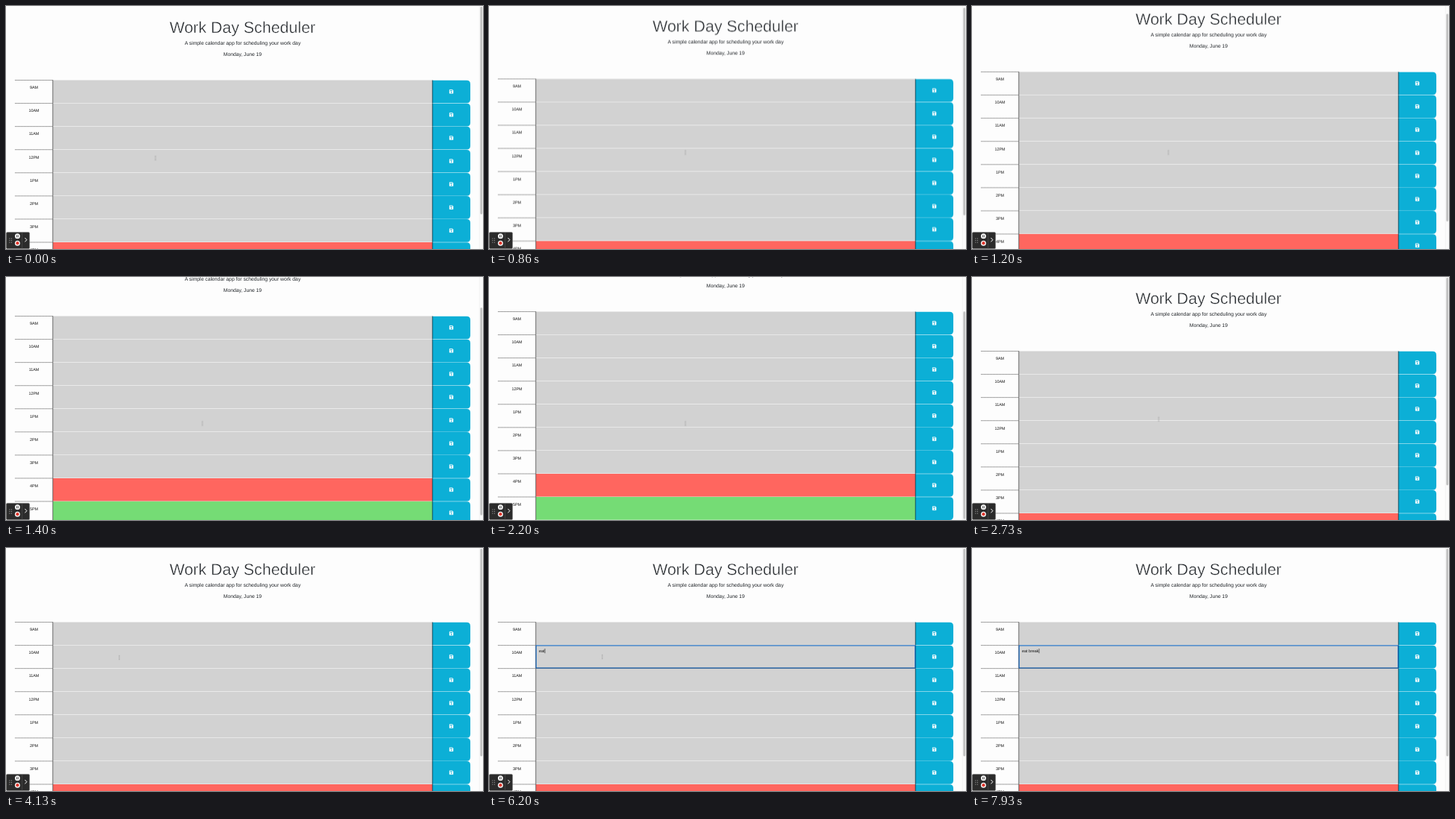
Animation, 640 px wide and 326 px high, one loop 8 s. Source, as an HTML page:

```html
<!DOCTYPE html>
<html lang="en">
<head>
<meta charset="utf-8">
<title>Work Day Scheduler</title>
<style>
  html, body { margin: 0; width: 100%; height: 100%; overflow: hidden; background: #fdfdfd; }
  svg { display: block; width: 100%; height: 100%; }
  text {
    font-family: "Liberation Sans", Arial, sans-serif;
    text-rendering: geometricPrecision;
    fill: #212529;
  }
  .title { font-size: 21.4px; stroke: #fdfdfd; stroke-width: .45px; }
  .lead { font-size: 6.82px; }
  .date { font-size: 6.75px; }
  .hour, #entry { font-size: 5.4px; fill: #111; white-space: pre; }
  .mid { text-anchor: middle; }

  .past { fill: #d2d2d2; }
  .present { fill: #ff665f; }
  .future { fill: #75dc75; }
  .save { fill: #0cafd6; }

  #page, #thumb { animation: scroll 8s linear infinite; }
  #page { --rate: -1px; }
  #thumb { --rate: .855px; }
  @keyframes scroll {
    0%, 10% { transform: translateY(0); }
    15% { transform: translateY(calc(var(--rate) * 11)); }
    17.5% { transform: translateY(calc(var(--rate) * 47)); }
    20%, 28% { transform: translateY(calc(var(--rate) * 53)); }
    30% { transform: translateY(calc(var(--rate) * 32)); }
    32.3%, 100% { transform: translateY(0); }
  }

  #pointer { animation: point 8s infinite, pointer-hide 8s step-end infinite; }
  @keyframes point {
    0%, 2% { transform: translate(200.5px, 204px); }
    9%, 33% { transform: translate(263.5px, 196.5px); }
    43%, 60% { transform: translate(152px, 147px); }
    66%, 100% { transform: translate(152px, 146px); }
  }
  @keyframes pointer-hide { 0% { opacity: .5; } 81% { opacity: 0; } }

  #focus { animation: focus 8s step-end infinite; }
  @keyframes focus { 0% { opacity: 0; } 58.75% { opacity: 1; } }
</style>
</head>
<body>
<svg viewBox="0 0 640 326">
  <defs>
    <g id="disk">
      <path d="M-2.5-2.5h4l1 1v4h-5z" fill="#fff" stroke="#fff" stroke-width=".4" stroke-linejoin="round"/>
      <path d="M-1.7-1.8h2.8v1.2h-2.8z" fill="#0cafd6"/>
      <circle cy="1.1" r=".8" fill="#0cafd6"/>
    </g>
  </defs>

  <g id="page">
    <text class="title mid" x="317.3" y="36">Work Day Scheduler</text>
    <text class="lead mid" x="317.5" y="51.7">A simple calendar app for scheduling your work day</text>
    <text class="date mid" x="317.5" y="67.2">Monday, June 19</text>
    <g id="rows"></g>
    <g id="focus">
      <rect x="63.2" y="130.9" width="508.6" height="30.1" fill="none" stroke="#1268c4" stroke-width="1.1"/>
      <path d="M63 161.2H572" stroke="#1b3f6b" stroke-width=".7"/>
      <text id="entry" x="67" y="140"></text>
      <rect id="caret" y="135" width=".6" height="6.2" fill="#111"/>
    </g>
  </g>

  <path d="M0-2.5V2.5M-.7-2.7H.7M-.7 2.7H.7" id="pointer" fill="none" stroke="#666" stroke-width=".6"/>

  <rect x="635" width="5" height="326" fill="#fafafa"/>
  <path d="M635.2 0V326" stroke="#ebebeb" stroke-width=".5"/>
  <rect id="thumb" x="636.3" y="1" width="2.9" height="278.5" rx="1.4" fill="#c1c1c1"/>

  <g id="recorder">
    <rect x=".4" y="303.6" width="31.2" height="22" rx="1.5" fill="#2b2b2b" stroke="#777" stroke-width=".6"/>
    <path d="M21.6 304V325.4" stroke="#555" stroke-width=".6"/>
    <path d="M4.9 311.5V318M7.4 311.5V318" stroke="#aaa" stroke-width="1" stroke-dasharray="1 1.6"/>
    <circle cx="15.4" cy="308.8" r="3.5" fill="#f4f4f4"/>
    <path d="M14.5 307.3v3M16.3 307.3v3" stroke="#333" stroke-width=".8"/>
    <circle cx="15.4" cy="318.2" r="3.5" fill="#f4f4f4"/>
    <circle cx="15.4" cy="318.2" r="2.1" fill="#e0352b"/>
    <path d="M25.4 311l2.5 2.7-2.5 2.7" fill="none" stroke="#fff" stroke-width="1"/>
  </g>
</svg>
<script>
  const TOP = 99.5, PITCH = 31.07, LOOP = 8000;
  const hours = ["9AM", "10AM", "11AM", "12PM", "1PM", "2PM", "3PM", "4PM", "5PM"];
  const stateOf = i => i < 7 ? "past" : i === 7 ? "present" : "future";

  document.getElementById("rows").innerHTML = hours.map((hour, i) => `
    <g transform="translate(0 ${TOP + i * PITCH})">
      <path d="M12 0H63" stroke="#444" stroke-width=".7" stroke-dasharray="1.4 .6"/>
      <text class="hour mid" x="37.5" y="11.8">${hour}</text>
      <rect class="${stateOf(i)}" x="63" width="509" height="${PITCH}"/>
      <path d="M63 ${PITCH}H572" stroke="#fff" stroke-width=".8"/>
      <path d="M62.8 0V${PITCH}" stroke="#444" stroke-width=".8"/>
      <path class="save" d="M572 .2H618q5 0 5 5V${PITCH - 5.2}q0 5-5 5H572z"/>
      <path d="M572.2 0V${PITCH}" stroke="#12333d" stroke-width=".8"/>
      <use href="#disk" x="597.5" y="15.3"/>
    </g>`).join("");

  const message = "eat break";
  const FOCUS_TIME = 4700;
  const keyTimes = [5600, 5850, 6050, 6480, 6750, 6980, 7200, 7430, 7700];
  const entry = document.getElementById("entry");
  const caret = document.getElementById("caret");

  function draw() {
    const t = performance.now() % LOOP;
    const count = keyTimes.filter(k => k <= t).length;
    const lastKey = count ? keyTimes[count - 1] : FOCUS_TIME;
    entry.textContent = message.slice(0, count);
    caret.setAttribute("x", 67.2 + (count ? entry.getComputedTextLength() : 0));
    caret.style.opacity = t >= lastKey && (t - lastKey) % 1060 < 530 ? 1 : 0;
    requestAnimationFrame(draw);
  }
  draw();
</script>
</body>
</html>
```
